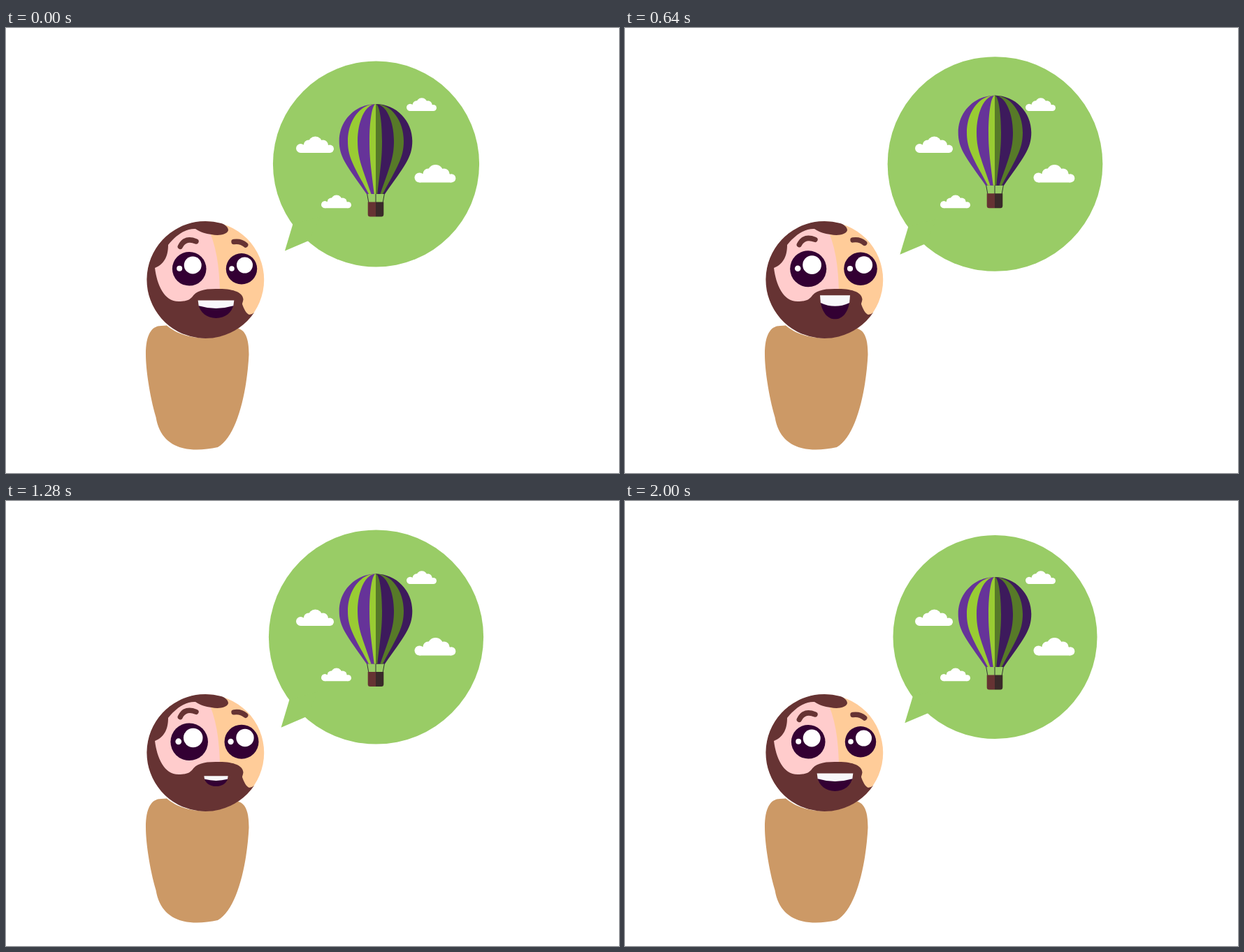
An HTML page that plays this animation: 877 by 638 pixels, repeating every 2.08 s.

```html
<!DOCTYPE html>
<html lang="en">
<meta charset="utf-8">
<title>Balloon daydream</title>
<style>
  html, body { margin: 0; width: 100%; height: 100%; overflow: hidden; background: #fff; }
  svg { display: block; width: 877px; height: 638px; }
</style>
<svg viewBox="0 0 877 638">
  <defs>
    <g id="cloud" fill="#fff">
      <circle cx="6.5" cy="17" r="6.5"/>
      <circle cx="18" cy="12" r="7"/>
      <circle cx="27.5" cy="10.2" r="10.2"/>
      <circle cx="38.5" cy="12.5" r="7.5"/>
      <circle cx="48.3" cy="17.8" r="5.7"/>
      <path d="M6.5 12H46L48.3 23.5H6.5Z"/>
    </g>
  </defs>

  <g id="bubble" fill="#9c6">
    <circle cx="529.5" cy="195" r="147.5"/>
    <path d="M410.5 281L399 319.5L433 305L450 270Z"/>
  </g>
  <use href="#cloud" transform="translate(415 155.5)"/>
  <use href="#cloud" transform="translate(573 100.3) scale(.796)"/>
  <use href="#cloud" transform="translate(584.5 196) scale(1.09)"/>
  <use href="#cloud" transform="translate(451 239.6) scale(.796)"/>

  <g id="balloon">
    <path d="M-12.5 128L-10 142M0 128V142M12.5 128L10 142" stroke="#333" fill="none"/>
    <g id="stripes"></g>
    <path d="M-11.3 140.5H0V161.5H-8Q-11.3 161.5 -11.3 158Z" fill="#633"/>
    <path d="M11.3 140.5H0V161.5H8Q11.3 161.5 11.3 158Z" fill="#3a2a2a"/>
  </g>

  <path fill="#c96" d="M230 426.5C241 436 259 444.3 286 444.8L331 430.5C343 433 347.5 446 347.5 468
    C345 520 331 585 303 601C262 610 222 604 214.5 558C206 530 200 490 200 468C200 440 208 427 222 427Z"/>
  <circle cx="285.5" cy="361" r="83.7" fill="#fc9"/>
  <path fill="#fcc" d="M288 285Q306 320 306 385L250 400L215 395L206 340L243 292L262 282Z"/>
  <path fill="#633" d="M308 280C314 282 318 286 318 290C316 297 303 298 294 296C285 295 279 293 271 288
    C258 287 243 297 232 311C232 325 228 338 213 344C216 368 226 392 247 392C258 392 262 390 266 386
    C272 377 282 374 300 374C325 373 339 379 339.5 389C339 393 338 394 338 396C340 402 344 410 348 411
    Q352 411 355 408A84 84 0 1 1 308 280Z"/>

  <g id="brows" fill="none" stroke="#633" stroke-width="7.4" stroke-linecap="round">
    <path d="M249.3 313.3Q256 299.5 272 306"/>
    <path d="M326 306.5Q336 305 342.7 311"/>
  </g>
  <g id="leftEye" fill="#fff">
    <circle r="24.3" fill="#303"/>
    <circle cx="5" cy="-5.2" r="12.5"/>
    <circle cx="-14" cy="-.4" r="4"/>
  </g>
  <g id="rightEye" fill="#fff">
    <circle r="22.2" fill="#303"/>
    <circle cx="4.5" cy="-5.2" r="11.5"/>
    <circle cx="-14" cy="-.2" r="3.8"/>
  </g>
  <g id="mouth">
    <path d="M.01 .2C.05 .7 .25 1 .5 1S.95 .7 .99 .2Z" fill="#303"/>
    <path d="M0 0H1L.98 .31Q.5 .6 .02 .31Z" fill="#f8f8fa"/>
  </g>
</svg>
<script>
const STEP = 80, LOOP = 2080;
const $ = id => document.getElementById(id);
const place = (id, transform) => $(id).setAttribute('transform', transform);

// Cyclic triangle wave: 0 at step low, 1 at step high.
function swing(s, low, high, cycle = 25) {
  const t = (s - low + cycle) % cycle, up = high - low;
  return t < up ? t / up : (cycle - t) / (cycle - up);
}

// Straight lines through [step, value] points.
function follow(s, ...points) {
  const i = Math.max(1, points.findIndex(p => p[0] >= s));
  const [s0, v0] = points[i - 1], [s1, v1] = points[i];
  return v0 + (v1 - v0) * (s - s0) / (s1 - s0);
}

const stripe = (w, fill) =>
  `<path fill="${fill}" d="M0 0C${.56 * w} 0 ${w} 24 ${w} 53C${w} 77 ${.78 * w} 89 ${.25 * w} 129H0Z"/>`;

$('stripes').innerHTML = [52.3, 40, 26, 9].map((w, i) =>
  stripe(-w, i % 2 ? '#9c3' : '#639') + stripe(w, i % 2 ? '#577a28' : '#3d1a5c')).join('');

function draw(now) {
  const s = Math.floor(now % LOOP / STEP);

  const size = (146 + 11 * swing(s, -2, 12, 27)) / 147.5;
  place('bubble', `translate(529.5 195) scale(${size}) translate(-529.5 -195)`);

  const height = follow(s, [0, 109], [6, 94], [15, 106], [21, 97.5], [25, 109]);
  place('balloon', `translate(529 ${height})`);

  const wonder = swing(s, 0, 14), eye = 1 + .125 * wonder;
  place('brows', `translate(0 ${-4.5 * wonder})`);
  place('leftEye', `translate(262.2 345.2) scale(${eye})`);
  place('rightEye', `translate(337 345.2) scale(${eye})`);

  const wide = 57.5 - 29 * swing(s, 3, 13);
  const open = follow(s, [0, 25.5], [3, 9], [8, 34], [13, 9], [21, 24.5], [25, 25.5]);
  const middle = 399.5 + 3.7 * swing(s, 3, 25);
  place('mouth', `translate(${300.5 - wide / 2} ${middle - open / 2}) scale(${wide} ${open})`);
}

const start = performance.now();
function tick() {
  draw(performance.now() - start);
  requestAnimationFrame(tick);
}
tick();
</script>
</html>
```
